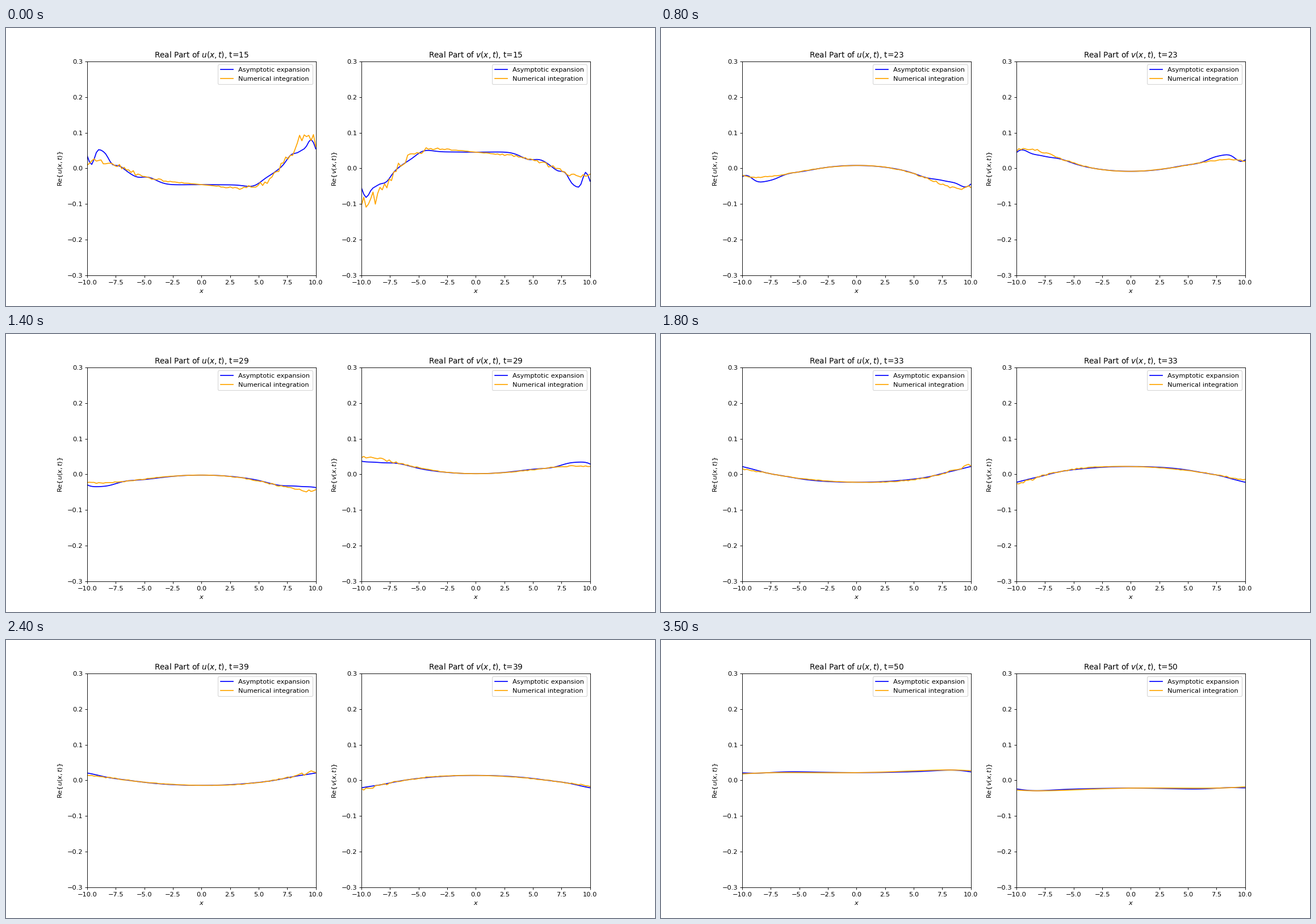
A matplotlib script for the animation above (3600 ms loop, 1143x490 px).

```python
import matplotlib.pyplot as plt
import numpy as np
from matplotlib.animation import FuncAnimation

WIDTH, HEIGHT = 1143, 490
DPI = HEIGHT / 6
FRAMES, INTERVAL = 36, 100
T_START, T_END = 15, 50
X = np.linspace(-10, 10, 100)


def wave(x, t, tilt):
    """Stationary-phase wave of the Gaussian pulse 0.25 exp(-x^2)."""
    xi, tau = x / t, np.sqrt(t * t - x * x)
    gamma = t / tau
    envelope = 0.25 / np.sqrt(2 * t) * gamma**1.5 * np.exp(-(gamma * xi)**2 / 4)
    return -envelope * (1 + tilt) * np.sin(tau - np.pi / 4)


def asymptotic(x, t):
    # The left-right imbalance comes and goes with the phase lag behind x = 0
    xi, lag = x / t, t - np.sqrt(t * t - x * x)
    return wave(x, t, (xi - 0.4 * xi**2) * np.sin(2.25 * lag)**4)


def jitter(t, seed):
    """Quadrature error: grows toward the edges and dies out with time."""
    rng = np.random.default_rng(1000 * seed + t)
    strength = 0.002 * (1 + max(0, 23 - t) / 2) * min(1, (T_END - t) / 9)
    spread = strength * np.abs(X / 10)**1.4 * (1 + 0.5 * X / 10)
    return spread * np.clip(rng.standard_normal(len(X)), -1.6, 1.6)


def integrated(t, seed):
    return wave(X, t, X / t) + jitter(t, seed)


plt.rcParams["font.family"] = "DejaVu Sans"
# The tiny margin keeps the pixel size from being rounded down
fig, axes = plt.subplots(
    1, 2, figsize=((WIDTH + 1e-6) / DPI, (HEIGHT + 1e-6) / DPI), dpi=DPI)
smooth_lines, rough_lines = [], []
for ax, name in zip(axes, "uv"):
    smooth_lines += ax.plot(X, 0 * X, color="blue", label="Asymptotic expansion")
    rough_lines += ax.plot(X, 0 * X, color="orange", label="Numerical integration")
    ax.set(xlim=(-10, 10), ylim=(-0.3, 0.3), xlabel="$x$",
           ylabel=rf"Re$\{{{name}(x,t)\}}$")
    ax.legend(loc="upper right")


def update(frame):
    t = T_START + frame
    # v is u mirrored in both directions
    smooth = asymptotic(X, t), -asymptotic(-X, t)
    rough = integrated(t, 1), -integrated(t, 2)[::-1]
    for i, name in enumerate("uv"):
        smooth_lines[i].set_ydata(smooth[i])
        rough_lines[i].set_ydata(rough[i])
        axes[i].set_title(f"Real Part of ${name}(x,t)$, t={t}")
    return smooth_lines + rough_lines


anim = FuncAnimation(fig, update, frames=FRAMES, interval=INTERVAL, repeat=True)
plt.show()
```
